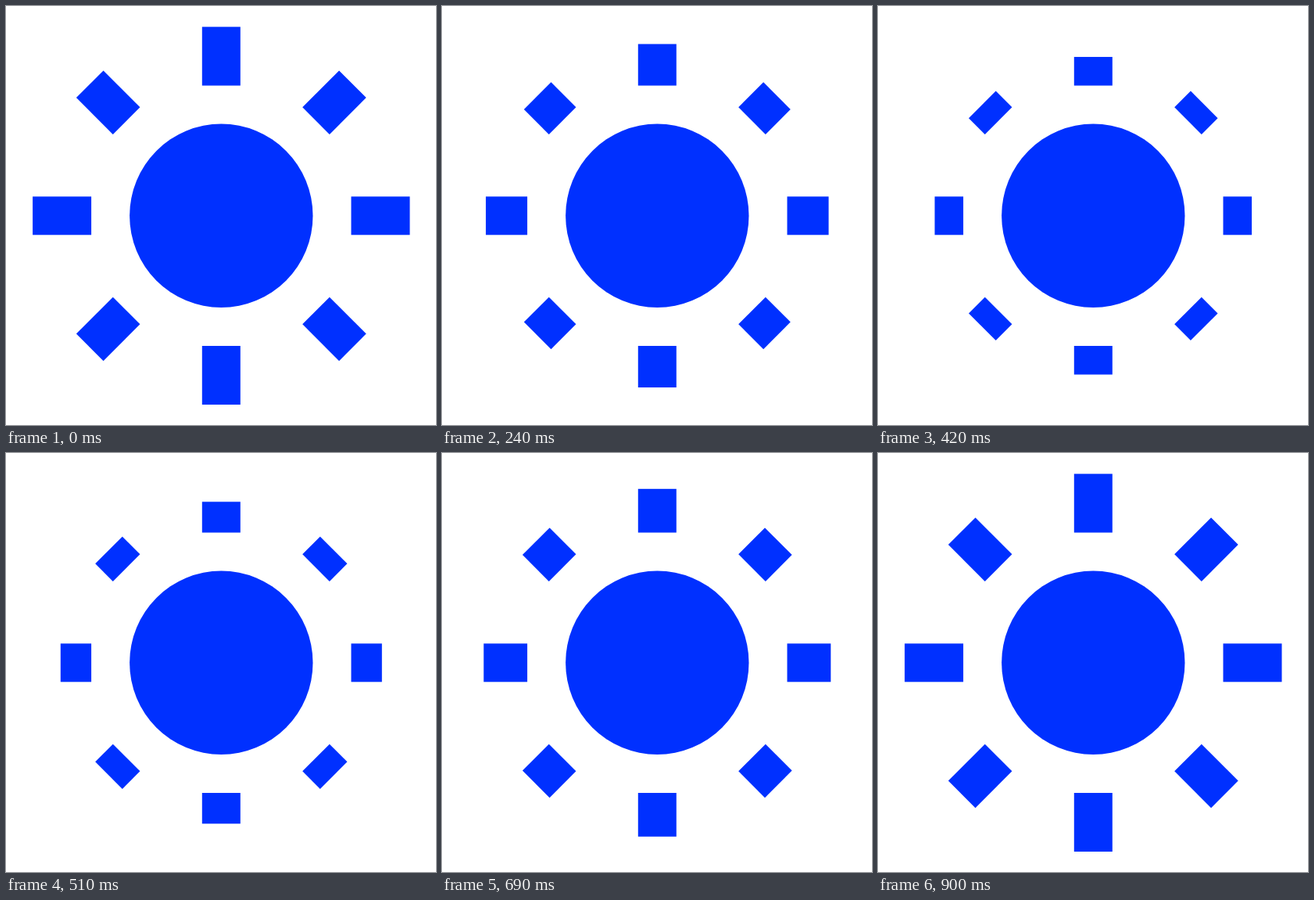
An HTML page with a canvas for the animation above (0.93 s loop, 550 px wide and 535 px high).

```html
<!DOCTYPE html>
<html lang="en">
<head>
<meta charset="utf-8">
<title>Sun</title>
<style>
  html, body { margin: 0; width: 100%; height: 100%; overflow: hidden; background: #fff; }
  canvas { display: block; }
</style>
</head>
<body>
<canvas id="stage" width="550" height="535"></canvas>
<script>
const ctx = document.getElementById('stage').getContext('2d');
const STEP = 30, LOOP = 930, HALF = 15;
const RADIUS = 117.2, RAY_WIDTH = 49;
const straight = { start: 166.2, length: 75, shrink: 2.745 };
const diagonal = { start: 171.4, length: 66.3, shrink: 2.64 };

function draw(now) {
  const step = Math.floor(now % LOOP / STEP);
  const depth = HALF - Math.abs(step - HALF); // rays shrink, then grow back

  ctx.setTransform(1, 0, 0, 1, 0, 0);
  ctx.fillStyle = '#fff';
  ctx.fillRect(0, 0, 550, 535);
  ctx.translate(275.3, 267.8);
  ctx.fillStyle = '#0030ff';
  ctx.beginPath();
  ctx.arc(0, 0, RADIUS, 0, Math.PI * 2);
  ctx.fill();

  for (let i = 0; i < 8; i++) {
    const ray = i % 2 ? diagonal : straight;
    ctx.fillRect(ray.start, -RAY_WIDTH / 2, ray.length - ray.shrink * depth, RAY_WIDTH);
    ctx.rotate(Math.PI / 4);
  }
}

const begin = performance.now();
function tick() {
  draw(performance.now() - begin);
  requestAnimationFrame(tick);
}
tick();
</script>
</body>
</html>
```
